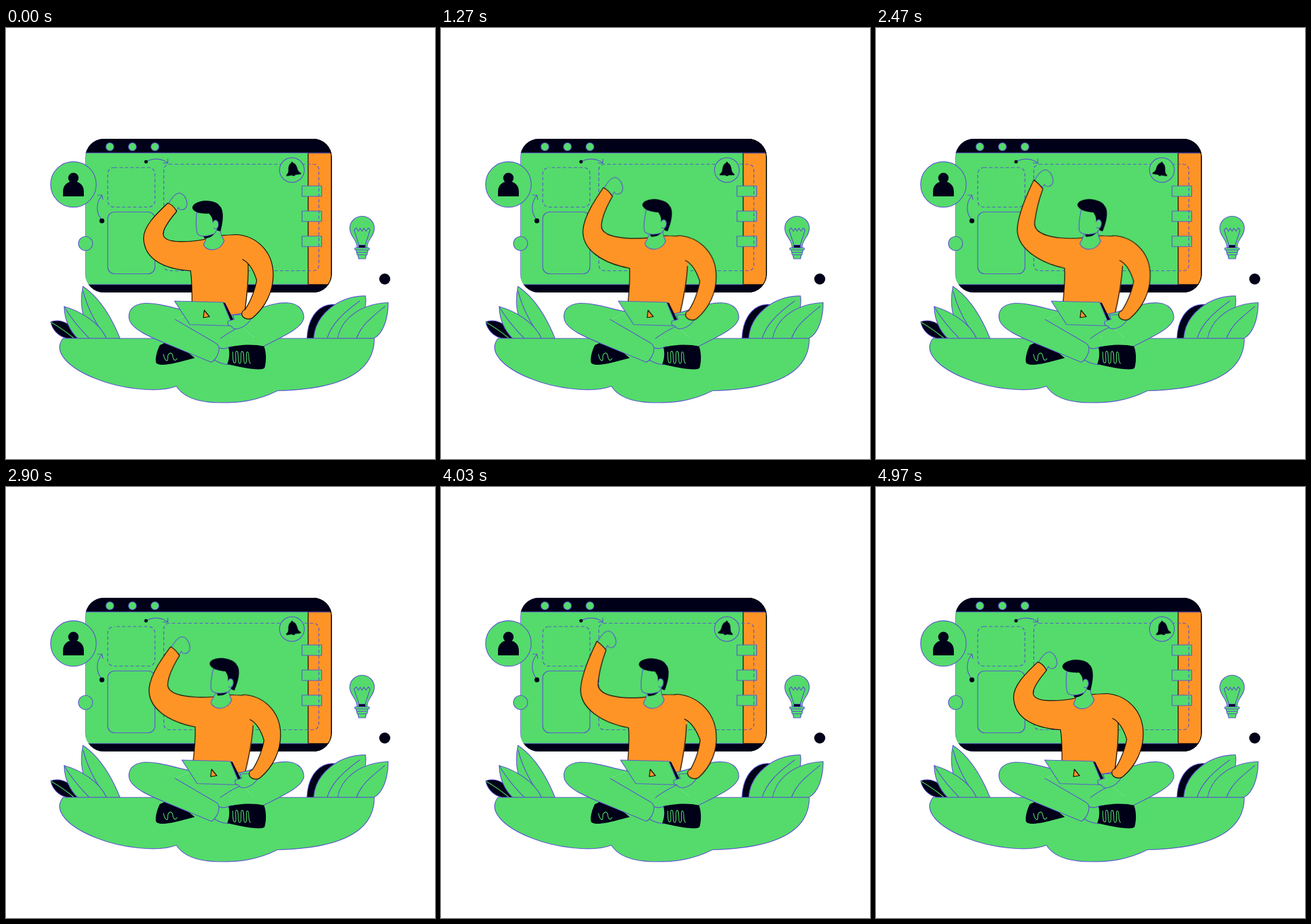
Recreate the animation shown at these times as an HTML page without scripts. Size 700 px wide and 704 px high, loop 5010 ms.

```html
<!DOCTYPE html>
<html lang="en">
<head>
<meta charset="utf-8">
<title>Waving at the desk</title>
<style>
html, body { margin: 0; width: 100%; height: 100%; overflow: hidden; background: #fff; }
svg { display: block; width: 100vw; height: 100vh; }

.g { fill: #54db6b; }
.o { fill: #ff9426; }
.k { fill: #000018; }
.n { fill: none; }
.line { stroke: #5a50d2; stroke-width: 1.2; stroke-linejoin: round; stroke-linecap: round; }
.ink { stroke: #000; stroke-width: 1.2; stroke-linejoin: round; stroke-linecap: round; }
.lace { fill: none; stroke: #54db6b; stroke-width: 1.2; stroke-linecap: round; }
.dash { stroke-dasharray: 5.5 3.5; stroke-linecap: butt; animation: march 5.01s linear infinite; }

#torso, #head, #lap, #sleeve, #arm, #hand { animation: 5.01s cubic-bezier(.37,0,.63,1) infinite; }
#torso { transform-origin: 352px 470px; animation-name: lean; }
#head { transform-origin: 340px 345px; animation-name: nod; }
#lap { animation-name: slide; }
#sleeve { transform-origin: 390px 472px; animation-name: shear; }
#arm { animation-name: wave; }
#hand { transform-origin: 264px 286px; animation-name: palm; }
#bell { transform-origin: 466.5px 219px; animation: ring .7157s cubic-bezier(.37,0,.63,1) infinite; }

@keyframes march { to { stroke-dashoffset: -54; } }
@keyframes ring {
  0%, 100% { transform: rotate(-8deg); }
  50% { transform: rotate(10deg); }
}
@keyframes lean {
  0%, 100% { transform: rotate(0deg); }
  16.67%, 66.67% { transform: rotate(6deg); }
  33.33% { transform: rotate(4.1deg); }
}
@keyframes nod {
  0%, 100% { transform: translate(0, 0) rotate(0deg); }
  16.67%, 66.67% { transform: translate(9px, -1.5px) rotate(2deg); }
  33.33% { transform: translate(6px, -1px) rotate(1.4deg); }
}
@keyframes slide {
  0%, 100% { transform: translate(0, 0); }
  16.67% { transform: translate(14.7px, 0); }
  33.33% { transform: translate(14px, 0); }
  50% { transform: translate(11px, 0); }
  83.33% { transform: translate(18px, 0); }
}
@keyframes shear {
  0%, 100% { transform: translate(0, 0) skewX(0deg); }
  16.67% { transform: translate(0, 2px) skewX(0deg); }
  33.33% { transform: translate(0, 1.3px) skewX(1.9deg); }
  50% { transform: translate(0, 1.7px) skewX(-.4deg); }
  66.67% { transform: translate(0, 2px) skewX(.3deg); }
  83.33% { transform: translate(0, 1px) skewX(4.2deg); }
}
@keyframes wave {
  0%, 100% { d: path("M326 345C304 349 258 354 256.5 337C256 328 268 312 278.5 299.5Q272 288 264 286C245 304 224 324 224.5 344C226 378 258 394 301 396.5"); }
  33.33%, 66.67% { d: path("M326 345C304 349 256 354 254 338C253 328 265 311 275.5 298.5Q269 288 259.5 286C242 304 222 326 222 346C223 379 256 394 301 396.5"); }
  19%, 50%, 83.33% { d: path("M326 344.5C300 349 243 353 246 324C247 305 250 287 254.5 270.5Q247 262 238.5 257C229 283 219 312 218.5 337C219 370 258 391 301 396.5"); }
}
@keyframes palm {
  0%, 100% { transform: translate(0, 0) rotate(0deg); }
  33.33%, 66.67% { transform: translate(-4px, 0) rotate(-6deg); }
  19%, 50%, 83.33% { transform: translate(-25.5px, -29px) rotate(-5deg); }
}
</style>
</head>
<body>
<svg viewBox="0 0 700 704">
  <defs>
    <clipPath id="frame"><rect x="129.500" y="181" width="402" height="251" rx="30"/></clipPath>
  </defs>

  <!-- window -->
  <rect class="n line" x="130" y="181.500" width="401" height="250" rx="30"/>
  <g clip-path="url(#frame)">
    <path class="g" d="M130.500 204H532V419H130.500Z"/>
    <path class="o ink" d="M493 204H531V419H493Z"/>
    <path class="k" d="M129 181H532V204H129ZM129 419H532V432H129Z"/>
    <path class="n line" d="M130 204H531M130 419H493"/>
  </g>
  <path class="n ink" d="M501 181.500A30 30 0 0 1 531 211.500V401.500A30 30 0 0 1 501 431.500"/>
  <g class="g line">
    <circle cx="169.500" cy="194" r="6.500"/>
    <circle cx="206.300" cy="194" r="6.500"/>
    <circle cx="243" cy="194" r="6.500"/>
    <path d="M483 258H515V275H483ZM483 299H515V316H483ZM483 340H515V357H483Z"/>
  </g>
  <g class="n line">
    <rect class="dash" x="257.500" y="222.500" width="253" height="174" rx="9"/>
    <rect class="dash" x="166" y="228" width="77" height="64.500" rx="10"/>
    <rect x="166" y="300.500" width="77" height="101" rx="11"/>
    <path d="M156 313C146 301 147 285 156.500 273M149.500 273L156.500 273L158 280"/>
    <path d="M229 218C240 212 254 213 263.500 220M264 214V221L256.500 220.500"/>
  </g>
  <circle class="k" cx="156.500" cy="315" r="4"/>
  <circle class="k" cx="228.500" cy="218.500" r="2.800"/>
  <circle class="g line" cx="466.500" cy="232" r="20.200"/>
  <g id="bell" class="k">
    <circle cx="466.500" cy="220" r="1.600"/>
    <path d="M466.500 220C461.500 220.500 459.500 226 459 231C458.500 235 457 237 454.500 238.500V240.500H478.500V238.500C476 237 474.500 235 474 231C473.500 226 471.500 220.500 466.500 220Z"/>
    <path d="M464 240A2.500 2 0 0 0 469 240Z"/>
  </g>

  <!-- avatar and floating bits -->
  <circle class="g line" cx="110" cy="255.500" r="37.200"/>
  <circle class="k" cx="110" cy="245" r="8.500"/>
  <path class="k" d="M93 275V267C93 256 101 250.500 110 250.500S127 256 127 267V275Z"/>
  <circle class="g line" cx="129.800" cy="352" r="11.500"/>
  <circle class="k" cx="618" cy="410" r="9"/>
  <g class="g line">
    <path d="M573 359C573 345 561 341 561 327A20 19.500 0 0 1 601 327C601 341 589 345 589 359Z"/>
    <path class="n" d="M576 355L568 330L571.500 326.500L575 332L578 327L581 332L584 327L587.500 332L591 326.500L594 330L586 355"/>
    <path class="k" d="M575.500 354.500H586.500V360H575.500Z"/>
    <path d="M574 370H588L586.500 377H575.500Z"/>
    <rect x="572.500" y="366" width="17" height="4.500" rx="1.500"/>
    <rect x="571.500" y="362" width="19" height="4.500" rx="1.500"/>
    <rect x="569" y="359" width="24" height="3.500" rx="1.500"/>
  </g>

  <!-- plants and ground -->
  <g class="g line">
    <path d="M186 507C172 472 152 440 125.500 422C119 456 126 486 152 507Z"/>
    <path class="n" d="M126 430C133 460 148 485 164 507"/>
    <path class="k" d="M73 480C88 474 112 483 118 507H100C85 504 75 492 73 480Z"/>
    <path class="lace" d="M74 481C88 489 99 497 110 506"/>
    <path d="M95 455C120 462 152 480 164 507H117C104 495 95 475 95 455Z"/>
    <path class="n" d="M95 455C107 476 122 493 136 507"/>
    <path class="k" d="M491 507C493 467 515 449 538 452L506 507Z"/>
    <path d="M502 507C505 467 543 438 586.500 437.500C590 460 577 490 560 507Z"/>
    <path class="n" d="M524 507C531 483 552 464 577 446"/>
    <path d="M541 507C548 472 582 450 623.500 448.500C624 474 615 500 600 507Z"/>
    <path class="n" d="M572 507C579 486 596 473 618 455"/>
    <path d="M93 507H601C601 558 555 590 443 592.500C408 610 379 612 350 612C314 612 290 604 278 585C248 597 186 589 147 573C104 556 75 530 93 507Z"/>
  </g>

  <!-- man -->
  <g id="torso">
    <path class="o" d="M301 396.500L318 346C345 338 360 338 378 338C396 345 396 380 396 390C396 420 393 450 388 476L303 475C305 440 303 415 301 396.500Z"/>
    <path class="n ink" d="M301 396.500C304 415 304 440 303 475M395 385C396 410 393 440 388 474M326 345C345 339 357 338 378 337.500"/>
    <path id="hand" class="g line" d="M265 287C270 278 276 270 283 269.500C291 271 295 280 295.500 287C295 294 291 297 286 297Q282 296 281.500 293L278 299Z"/>
    <path id="arm" class="o ink" d="M326 345C304 349 258 354 256.500 337C256 328 268 312 278.500 299.500Q272 288 264 286C245 304 224 324 224.500 344C226 378 258 394 301 396.500"/>
    <path class="g line" d="M327 342C326 347 324 350 322.500 354C327 366 350 366 356 347C353 342 350 338 350 331L338 328Z"/>
    <g id="head">
      <path class="k" d="M322 340L341 333C339 340 332 343 324 344Z"/>
      <path class="g line" d="M311 302C310 315 310 328 312 335C315 342 330 341 341 335L346 325L340 300Z"/>
      <path class="k" d="M304 294C304 288 312 283 325 282C338 282 346 286 348 290C356 296 355 315 350 332L345 331L337 318C338 312 335 307 331 303C322 304 306 302 304 294Z"/>
      <path class="g" d="M337 318C339 312 347 312 346.500 322C346 328 342 330 340 335L332 337L331 318Z"/>
      <path class="n line" d="M337.500 318C339 312 347 312 346.500 322C346 328 342 329 339.500 327"/>
    </g>
  </g>

  <!-- legs -->
  <path class="k" d="M251 518C246 528 243 540 245 547C250 553 270 549 285 545L308 539L290 524L260 514Z"/>
  <path class="lace" d="M257 533C259 544 264 546 264 540C263 532 270 527 272 535C273 544 277 544 279 540"/>
  <path class="g" d="M300 468H385L395 487L347 518Z"/>
  <path class="g line" d="M365 469C400 467 430 447 460 449C478 450 486 462 486 473C484 490 452 504 420 520"/>
  <path class="g" d="M365 469L420 520L347 520L390 488Z"/>
  <path class="n line" d="M388 486C370 492 352 505 337 517"/>
  <path class="g line" d="M346 521C353 526 360 523 368 520L363 550C353 549 344 546 337 540Z"/>
  <path class="k" d="M363 522C378 517 405 516 421 520C425 530 425 545 422 555C418 561 385 555 361 549C365 539 365 530 363 522Z"/>
  <path class="lace" d="M370 529C370 537 370 547 373 547C378 547 372 529 376 528C381 527 377 548 381 548C386 548 381 529 385 528C390 528 386 548 390 548C395 548 390 529 394 529C398 529 394 546 399 548"/>
  <path class="g" d="M304 464L276 476L345 516L370 470Z"/>
  <path class="g line" d="M304 464C275 458 248 449 227 449.500C206 451 199 462 201 475C204 492 235 505 270 519L335 546C342 542 348 532 347.500 523C347 518 345 516 341 514L276 476"/>

  <!-- laptop and resting arm -->
  <g id="lap">
    <path class="k" d="M353 448L357.500 449L372 478L369 486Z"/>
    <path class="g line" d="M275 446L354 448L370 486.500L300 484.500Z"/>
    <path class="o ink" d="M323.500 461L332 471.500L322 473Z"/>
    <path class="g line" d="M386 468L370 469L372.500 476L362 479C361 484 362 486 368 487C369 494 388 494 400 475Z"/>
    <g id="sleeve">
      <path class="o ink" d="M374 337.500C405 338 436 362 436 403C436 430 424 455 403 473C398 477 388 476 385 469C384 464 387 461 390 460C400 445 407 425 409 412C405 399 398 384 386 378"/>
    </g>
  </g>
</svg>
</body>
</html>
```
